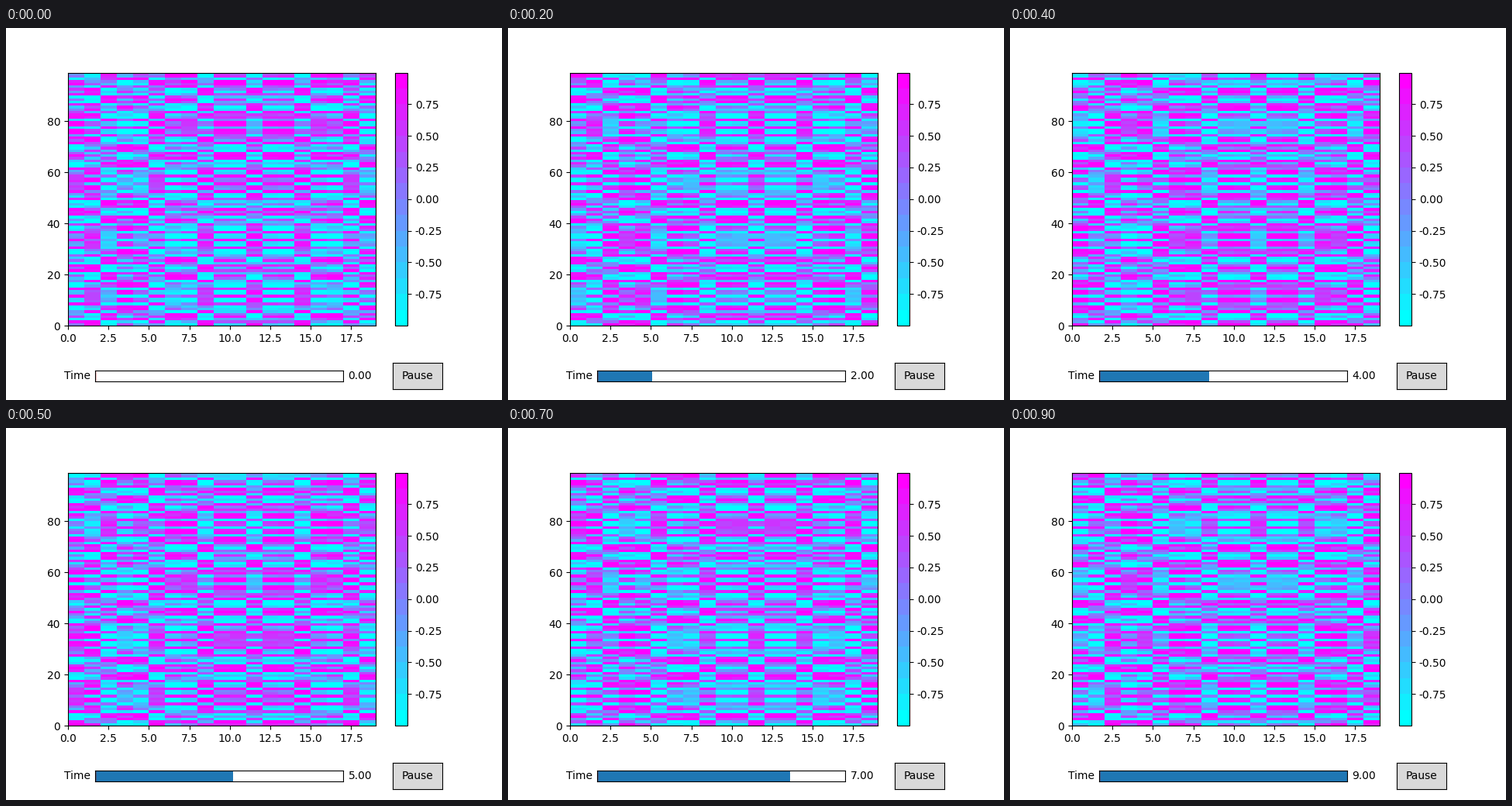
Write a matplotlib script that moves like this. It is 640 px wide and 480 px high and loops after 1 s.

```python
import matplotlib.pyplot as plt
import numpy as np
from matplotlib.animation import FuncAnimation
from matplotlib.patches import Rectangle

STEPS = 10
LAST = STEPS - 1

plt.rcParams.update({"font.family": "DejaVu Sans", "font.size": 10})

x, y = np.arange(20), np.arange(100)
X, Y = np.meshgrid(x, y)


def wave(t):
    return np.sin(X**2 + Y**2 - t)


def bare_axes(rect, color):
    panel = fig.add_axes(rect, facecolor=color)
    panel.set(xticks=[], yticks=[], xlim=(0, 1), ylim=(0, 1))
    return panel


fig, ax = plt.subplots(figsize=(6.4, 4.8), dpi=100)
fig.subplots_adjust(left=0.125, right=0.9, bottom=0.2, top=0.88)

start = wave(0)
mesh = ax.pcolormesh(x, y, start[:-1, :-1], shading="flat",
                     cmap=plt.get_cmap("cool", 16),
                     vmin=start.min(), vmax=start.max())
ax.set_xticks(np.arange(0, 19, 2.5))
ax.set_yticks(np.arange(0, 99, 20))
ax.set(xlim=(0, 19), ylim=(0, 99))
fig.colorbar(mesh, ax=ax, ticks=np.arange(-0.75, 0.8, 0.25), format="%.2f")

# Time slider
slider = bare_axes([0.18, 0.05, 0.5, 0.03], "white")
slider.set_xlim(0, LAST)
bar = slider.add_patch(Rectangle((0, 0), 0, 1, facecolor="C0", edgecolor="none"))
slider.axvline(0, color="red", lw=1)
slider.text(-0.02, 0.5, "Time", transform=slider.transAxes, ha="right", va="center")
readout = slider.text(1.02, 0.5, "", transform=slider.transAxes,
                      ha="left", va="center")

# Pause button
button = bare_axes([0.78, 0.03, 0.1, 0.07], "0.85")
button.text(0.5, 0.5, "Pause", ha="center", va="center")


def update(t):
    mesh.set_array(wave(t)[:-1, :-1])
    bar.set_width(t)
    readout.set_text(f"{t:.2f}")
    return mesh, bar, readout


anim = FuncAnimation(fig, update, frames=STEPS, interval=100, repeat=True,
                     repeat_delay=0, blit=False)
plt.show()
```
